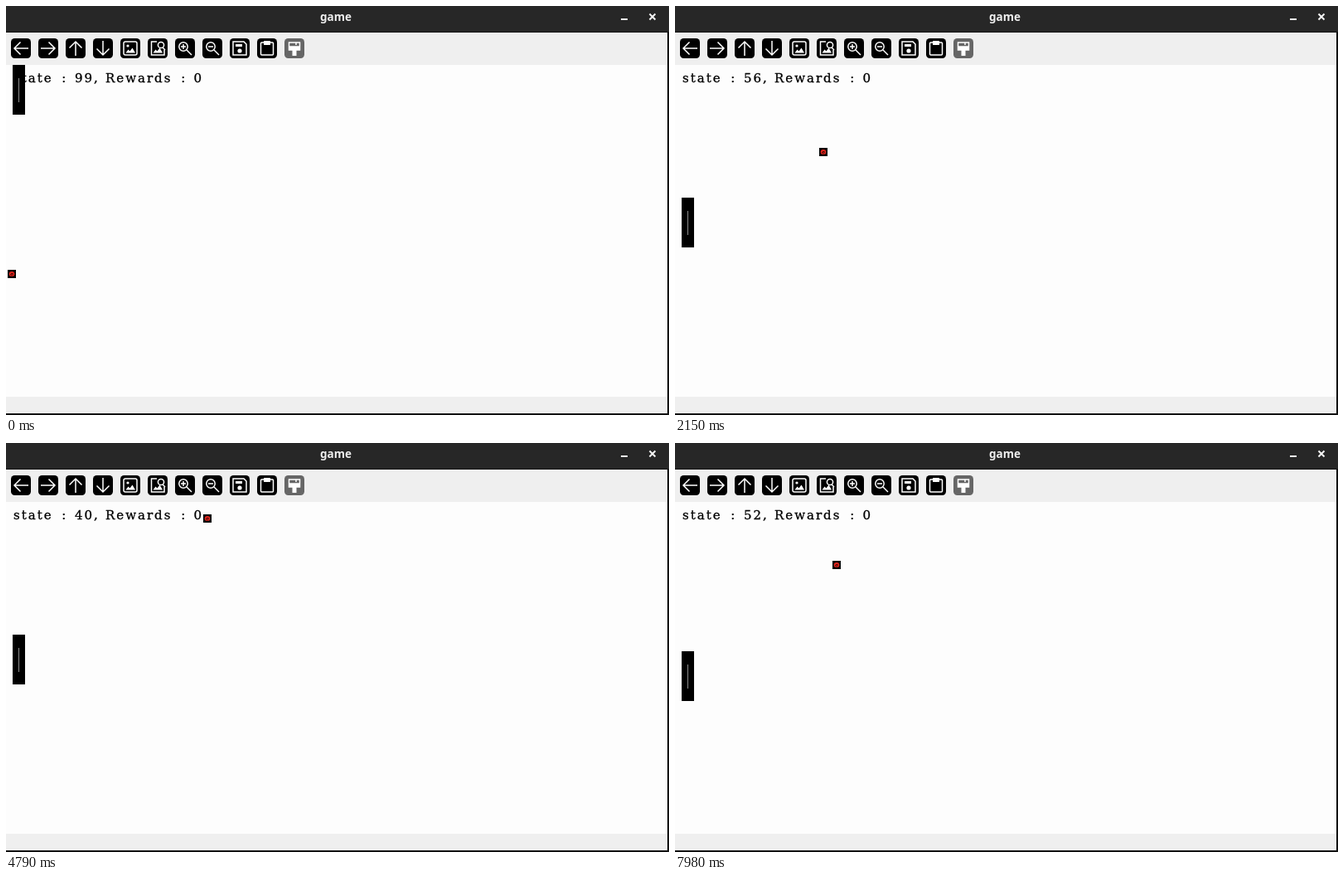
These frames come from a looping animation (800 by 493 pixels, 8 s). An HTML page:

```html
<!DOCTYPE html>
<html lang="en">
<head>
<meta charset="utf-8">
<title>game</title>
<style>
  html, body { margin: 0; width: 100%; height: 100%; overflow: hidden; background: #fdfdfd; }
  svg { display: block; }
  .icon { fill: none; stroke: #fff; stroke-width: 1.5; }
  .icon .solid { fill: #fff; stroke: none; }
  .label { font: 15px "DejaVu Serif", serif; letter-spacing: 2px; word-spacing: 4px; stroke: #000; stroke-width: .3; }
  .title { font: bold 13.5px "Noto Sans", "Open Sans", sans-serif; fill: #eee; text-anchor: middle; }
</style>
</head>
<body>
<svg width="800" height="493" viewBox="0 0 800 493">
  <rect width="800" height="493" fill="#121212"/>
  <rect width="800" height="31" fill="#272727"/>
  <rect y="32" width="798" height="459" fill="#efefef"/>
  <rect y="71" width="798" height="400" fill="#fdfdfd"/>
  <text class="title" x="398" y="18">game</text>
  <path d="M742 16h8M776.5 9.5l7 7m0-7l-7 7" stroke="#f4f4f4" stroke-width="2"/>
  <g id="toolbar"></g>
  <g class="label">
    <text x="9" y="92">state :</text>
    <text id="state" x="83" y="92"></text>
    <g id="rewards">
      <text x="120" y="92">Rewards :</text>
      <text x="226.5" y="92">0</text>
    </g>
  </g>
  <g id="paddle">
    <rect width="15" height="60"/>
    <path d="M7.5 16v29" stroke="#8c8c8c"/>
  </g>
  <g id="ball">
    <rect width="10" height="10"/>
    <ellipse cx="5" cy="5" rx="3.4" ry="3" fill="#e0241c"/>
    <path d="M3 6.2Q5 2.8 7 5.4M5 5.5v2" fill="none" stroke="#200" stroke-width=".9"/>
  </g>
</svg>
<script>
const $ = id => document.getElementById(id);

const arrow = angle =>
  `<path transform="rotate(${angle} 12 12)" d="M21 12H4.5M11.5 4.5L4 12l7.5 7.5"/>`;
const hills = '<path class="solid" d="M6.5 17.5l3-4 2 2 3-4 3.5 6z"/>';
const lens = '<circle cx="10" cy="10" r="5.2"/><path d="M14 14l6 6"/>';
const icons = [
  arrow(0), arrow(180), arrow(90), arrow(270),
  `<rect x="4" y="4" width="16" height="16" rx="2"/><circle class="solid" cx="9" cy="9" r="1.6"/>${hills}`,
  `<path d="M11 4H4.5v16H20v-6"/><circle cx="16" cy="8" r="3.6"/><path d="M18 11l3 3"/>${hills}`,
  lens + '<path d="M7 10h6M10 7v6"/>',
  lens + '<path d="M7 10h6"/>',
  '<path d="M4 4h13l3 3v13H4z"/><path class="solid" d="M7 7h8v3H7z"/><circle class="solid" cx="12" cy="15" r="2.6"/>',
  '<rect x="4.5" y="5" width="15" height="15" rx="1"/><path class="solid" d="M8 3h8v5H8z"/>',
  '<path d="M5.5 5h13v9h-13zM6 10h12M14 5v3"/><path class="solid" d="M6 10h12v4H6zM9.5 14h5v7h-5z"/>'
];
$('toolbar').innerHTML = icons.map((shape, i) =>
  `<g class="icon" transform="translate(${6 + 33 * i} 39)">
    <rect width="24" height="24" rx="4.5" stroke="none" fill="${i < 10 ? '#000' : '#666'}"/>${shape}
  </g>`).join('');

const LOOP = 8000;
const ROUND_STEPS = 25;

// The game's pace drifts a little: [time, steps played].
const pace = [[0, 0], [770, 22], [2150, 64], [3080, 92], [4790, 135], [6170, 172], [7540, 200], [LOOP, 214]];

// Each round has one ball height and one paddle row to settle on.
const rounds = [
  { ball: 318, row: 0 }, { ball: 364, row: 14 }, { ball: 226, row: 15 }, { ball: 171, row: 8 },
  { ball: 293, row: 9 }, { ball: 150, row: 15 }, { ball: 86, row: 8 }, { ball: 258, row: 10 },
  { ball: 200, row: 12 }, { ball: 142, row: 9 }
];

function stepsAt(time) {
  const i = pace.findIndex(([t]) => t > time);
  const [t0, s0] = pace[i - 1], [t1, s1] = pace[i];
  return Math.floor(s0 + (s1 - s0) * (time - t0) / (t1 - t0));
}

// The paddle starts each round at the top, descends, then hovers one row up and down.
function paddleRow(step, row) {
  if (step === ROUND_STEPS) return 0;
  return step <= row ? step : row - (step - row) % 2;
}

const moveTo = (id, x, y) => $(id).setAttribute('transform', `translate(${x} ${y})`);

function draw(time) {
  const played = stepsAt(time) + ROUND_STEPS - 1;
  const step = played % ROUND_STEPS + 1;
  const { ball, row } = rounds[Math.floor(played / ROUND_STEPS)];
  const state = Math.min(99, 4 * step);

  $('state').textContent = state + ',';
  moveTo('rewards', state < 10 ? -11 : 0, 0);
  moveTo('paddle', 8, 71 + 20 * paddleRow(step, row));
  moveTo('ball', 2 + 4 * (99 - state), ball);
}

const start = performance.now();
function tick() {
  draw((performance.now() - start) % LOOP);
  requestAnimationFrame(tick);
}
tick();
</script>
</body>
</html>
```
